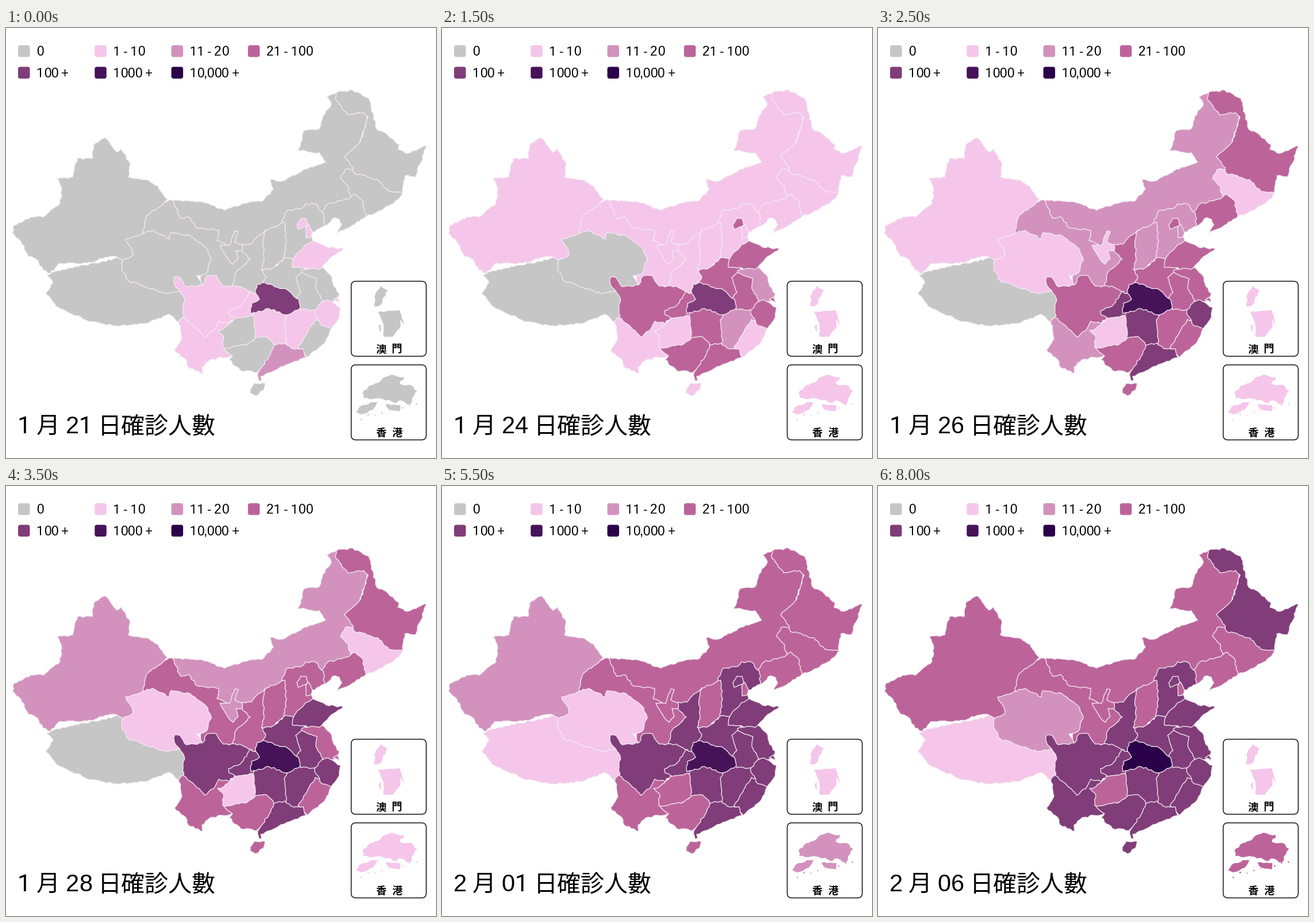
Animation, 748 px wide and 748 px high, one loop 9000 ms. Source, as a matplotlib script:

```python
import random

import matplotlib.pyplot as plt
from matplotlib.animation import FuncAnimation
from matplotlib.patches import FancyBboxPatch, Polygon

SIZE, DPI = 748, 64
PX = 72 / DPI
COLORS = ["#c6c6c6", "#f5c6ea", "#d292bd", "#bc649a", "#803d79", "#461359", "#2b0149"]
LATIN, CJK = "Liberation Sans", "Noto Sans CJK JP"
ADVANCE = {" ": 0.248, ",": 0.196, "-": 0.276, "+": 0.567}
ONE = [(0.356, 0), (0.266, 0), (0.266, 0.602), (0.084, 0.536),
       (0.084, 0.617), (0.342, 0.715), (0.356, 0.715)]

fig = plt.figure(figsize=(SIZE / DPI, SIZE / DPI), dpi=DPI, facecolor="white")
ax = fig.add_axes([0, 0, 1, 1])
ax.set_xlim(0, SIZE)
ax.set_ylim(SIZE, 0)
ax.axis("off")

rng = random.Random(7)
regions = []


def roughen(coords, amount):
    """Break long edges into short, slightly irregular steps."""
    points = list(zip(coords[::2], coords[1::2]))
    result = []
    for (x0, y0), (x1, y1) in zip(points, points[1:] + points[:1]):
        length = ((x1 - x0) ** 2 + (y1 - y0) ** 2) ** 0.5
        steps = max(1, int(length / 4.5))
        result.append((x0, y0))
        for i in range(1, steps):
            t, off = i / steps, rng.uniform(-amount, amount)
            result.append((x0 + (x1 - x0) * t - (y1 - y0) / length * off,
                           y0 + (y1 - y0) * t + (x1 - x0) / length * off))
    return result


def area(starts, *coords, amount=1.5, line=1.35):
    """Add a region; starts holds the first day of level one, two and so on."""
    patch = Polygon(roughen(coords, amount), edgecolor="#f3ebf1", linewidth=line * PX,
                    joinstyle="round")
    regions.append((ax.add_patch(patch), starts))


def cjk(x, text, y, size, **style):
    ax.text(x, y, text, fontsize=size * PX, family=CJK, va="baseline", **style)


def label(x, y, text, size):
    """Set Latin text with a plain, footless figure one."""
    artists = []
    for char in text:
        width = ADVANCE.get(char, 0.5615) * size
        if char == "1":
            shape = [(x + u * size, y - v * size) for u, v in ONE]
            artists.append(ax.add_patch(Polygon(shape, facecolor="black", linewidth=0)))
        elif char != " ":
            artists.append(ax.text(x + width / 2, y, char, fontsize=size * PX, family=LATIN,
                                   ha="center", va="baseline"))
        x += width
    return artists


def rounded(x, y, side, radius, **style):
    ax.add_patch(FancyBboxPatch((x, y), side, side,
                                boxstyle=f"round,pad=0,rounding_size={radius}", **style))


# Legend
for i, text in enumerate(["0", "1 - 10", "11 - 20", "21 - 100", "100 +", "1000 +", "10,000 +"]):
    x, y = 21 + 133.3 * (i % 4), 30 + 37.5 * (i // 4)
    rounded(x, y, 20.5, 4, facecolor=COLORS[i], linewidth=0)
    label(x + 32, y + 18, text, 22.5)

# Regions; lower ones reach beneath the ones drawn after them.
# Tibet
area((9,), 80, 425, 205, 398, 240, 440, 305, 445, 316, 505, 300, 512, 283, 498, 248, 513,
     190, 518, 146, 511, 91, 486, 69, 462, 82, 443, 71, 430)
# Inner Mongolia
area((3, 5, 11), 283, 299, 345, 304, 380, 317, 410, 306, 448, 300, 465, 280, 459, 264,
     482, 266, 528, 242, 556, 233, 545, 217, 507, 213, 513, 198, 518, 179, 545, 175,
     551, 154, 566, 132, 558, 120, 575, 112, 632, 146, 605, 235, 605, 300, 545, 332,
     400, 390, 300, 345)
# Gansu
area((2, 5, 7), 236, 352, 241, 328, 268, 305, 289, 299, 304, 331, 317, 328, 333, 348,
     370, 352, 367, 370, 385, 378, 418, 388, 425, 402, 412, 417, 398, 450, 340, 452,
     338, 395, 250, 365)
# Xinjiang
area((2, 7, 12), 152, 204, 173, 191, 193, 216, 201, 210, 216, 237, 213, 259, 244, 264,
     264, 275, 281, 299, 245, 327, 238, 352, 245, 370, 212, 408, 190, 397, 163, 401,
     150, 408, 92, 410, 77, 427, 64, 421, 55, 404, 39, 397, 26, 371, 11, 357, 14, 343,
     43, 329, 65, 329, 94, 305, 97, 282, 89, 262, 116, 259, 124, 227, 150, 227)
# Qinghai
area((4, 12), 208, 367, 255, 352, 284, 367, 287, 356, 320, 361, 351, 386, 357, 404,
     348, 427, 332, 431, 342, 450, 290, 459, 277, 462, 213, 440, 201, 420, 203, 404,
     221, 395, 216, 380)
# Jilin
area((2, 8, 11), 590, 246, 640, 245, 690, 287, 682, 298, 654, 317, 626, 328, 600, 300,
     596, 276, 582, 262)
# Liaoning
area((1, 4, 5), 607, 289, 620, 300, 626, 328, 607, 341, 576, 357, 584, 342, 580, 333,
     572, 330, 553, 345, 543, 325, 560, 306, 596, 297)
# Heilongjiang
area((2, 4, 5, 13), 575, 112, 603, 108, 631, 122, 645, 176, 665, 187, 684, 203, 682, 211,
     699, 218, 732, 205, 712, 259, 694, 257, 690, 286, 666, 284, 647, 264, 606, 253,
     604, 243, 589, 224, 617, 197, 630, 155, 622, 147, 594, 151, 574, 126)
# Shaanxi
area((2, 4, 5, 11), 452, 351, 458, 370, 455, 440, 432, 470, 394, 450, 400, 425, 412, 415,
     425, 402, 409, 386, 411, 376, 426, 376, 438, 362)
# Ningxia
area((1, 6, 10), 372, 378, 389, 378, 398, 353, 404, 354, 398, 372, 411, 378, 411, 387,
     400, 387, 404, 401, 395, 411, 386, 402, amount=0.8)
# Hebei
area((1, 4, 6, 11), 489, 317, 514, 314, 521, 306, 538, 306, 552, 322, 554, 345, 529, 358,
     534, 371, 510, 405, 480, 406, 480, 338)
# Beijing, Tianjin
area((0, 2, 3, 8), 506, 342, 513, 331, 522, 331, 525, 343, 508, 350, amount=0.8)
area((0, 4, 6), 522, 346, 526, 341, 533, 355, 530, 364, 522, 365, amount=0.8)
# Shanxi
area((1, 5, 6), 452, 352, 485, 338, 488, 370, 484, 402, 463, 419, 444, 420, 449, 400,
     447, 371)
# Henan
area((1, 3, 3, 6), 446, 422, 465, 417, 487, 399, 499, 401, 522, 420, 515, 465, 500, 475,
     440, 455, 452, 432)
# Jiangsu
area((1, 3, 4, 8), 514, 422, 546, 413, 565, 430, 570, 449, 580, 462, 574, 474, 545, 478)
# Shandong
area((0, 3, 3, 7), 534, 370, 557, 381, 587, 384, 562, 402, 544, 420, 498, 416, 501, 400,
     521, 377)
# Sichuan
area((0, 3, 3, 7), 293, 433, 303, 434, 313, 450, 342, 447, 350, 431, 366, 431, 378, 449,
     407, 449, 428, 459, 410, 495, 355, 540, 340, 545, 308, 505, 310, 470, 293, 446)
# Yunnan
area((0, 4, 6, 12), 307, 503, 321, 514, 346, 538, 364, 522, 370, 510, 392, 515, 388, 555,
     394, 570, 355, 577, 341, 590, 342, 601, 317, 590, 313, 577, 293, 560, 306, 540,
     301, 509)
# Jiangxi
area((0, 3, 4, 7), 480, 500, 495, 485, 535, 485, 546, 505, 525, 550, 500, 565, 480, 558)
# Fujian
area((1, 4, 5, 9), 538, 507, 552, 510, 566, 523, 556, 545, 524, 573, 508, 556, 525, 528)
# Hunan
area((0, 3, 3, 5), 425, 500, 435, 483, 470, 484, 489, 500, 484, 508, 488, 542, 485, 555,
     460, 562, 425, 548)
# Guizhou
area((1, 8, 10), 368, 526, 379, 523, 409, 496, 431, 502, 434, 542, 402, 560, 377, 556,
     378, 535)
# Guangxi
area((1, 3, 3, 12), 379, 557, 420, 550, 434, 539, 453, 537, 470, 556, 465, 580, 437, 599,
     408, 596, 388, 577, 394, 570)
# Guangdong
area((0, 0, 3, 5), 460, 568, 466, 552, 485, 548, 496, 557, 517, 558, 522, 573, 493, 584,
     456, 600, 443, 606, 445, 613, 440, 614, 438, 600)
# Hainan
area((1, 4, 5, 16), 425, 628, 432, 618, 451, 618, 448, 630, 434, 640, 425, 635)
# Chongqing
area((0, 3, 3, 5), 387, 492, 407, 484, 425, 458, 444, 468, 430, 500, 400, 505, 388, 499)
# Zhejiang, Shanghai
area((0, 2, 3, 4), 542, 477, 560, 473, 582, 486, 580, 503, 566, 523, 550, 518, 537, 497)
area((0, 3, 3, 9), 569, 473, 576, 468, 580, 478)
# Anhui
area((1, 3, 3, 6), 504, 434, 514, 425, 541, 436, 539, 453, 551, 474, 538, 490, 513, 490,
     500, 475, 513, 460)
# Hubei
area((0, 0, 0, 0, 4, 12), 437, 446, 446, 443, 490, 456, 509, 472, 512, 487, 489, 499,
     457, 488, 426, 497, 427, 479, 441, 472, 434, 461)

# Insets
for top, chars in [(440.5, "澳門"), (586, "香港")]:
    rounded(600.5, top, 130.5, 8, facecolor="white", edgecolor="black", linewidth=1.4 * PX)
    for x, char in zip((653, 680), chars):
        cjk(x, char, top + 123.5, 18, ha="center", weight="bold")

macau = (1,)
area(macau, 652, 449, 664, 457, 651, 482, 640, 484, 643, 462, line=0)
area(macau, 647, 494, 685, 491, 693, 518, 686, 507, 686, 521, 673, 537, 657, 537,
     656, 513, amount=0.8, line=0)
area(macau, 648, 518, 653, 516, 652, 530, line=0)

hong_kong = (1, 10, 15)
area(hong_kong, 620, 634, 630, 624, 671, 603, 692, 607, 685, 619, 704, 621, 715, 631,
     703, 655, 688, 648, 675, 652, 655, 645, 622, 644, amount=2.2, line=0)
area(hong_kong, 609, 668, 620, 656, 650, 648, 638, 664, 617, 672, amount=2, line=0)
area(hong_kong, 660, 655, 686, 656, 685, 667, 664, 662, line=0)
for i in range(9):
    x, y, r = 618 + 12 * i, 678 - 3.2 * i + rng.uniform(-3, 3), rng.uniform(1, 2.5)
    area(hong_kong, x - r, y, x, y - r, x + r, y, x, y + r, line=0)

# Date line
cjk(53, "月", 705, 41)
cjk(160, "日確診人數", 705, 41)
date_artists = []


def update(frame):
    day = min(frame, 16)
    for patch, starts in regions:
        patch.set_facecolor(COLORS[sum(start <= day for start in starts)])
    while date_artists:
        date_artists.pop().remove()
    month, date = (1, 21 + day) if day < 11 else (2, day - 10)
    date_artists.extend(label(20, 705, str(month), 41.5))
    date_artists.extend(label(103.5, 705, f"{date:02d}", 41.5))
    return []


anim = FuncAnimation(fig, update, frames=18, interval=500, repeat=True, repeat_delay=0, blit=False)
plt.show()
```
